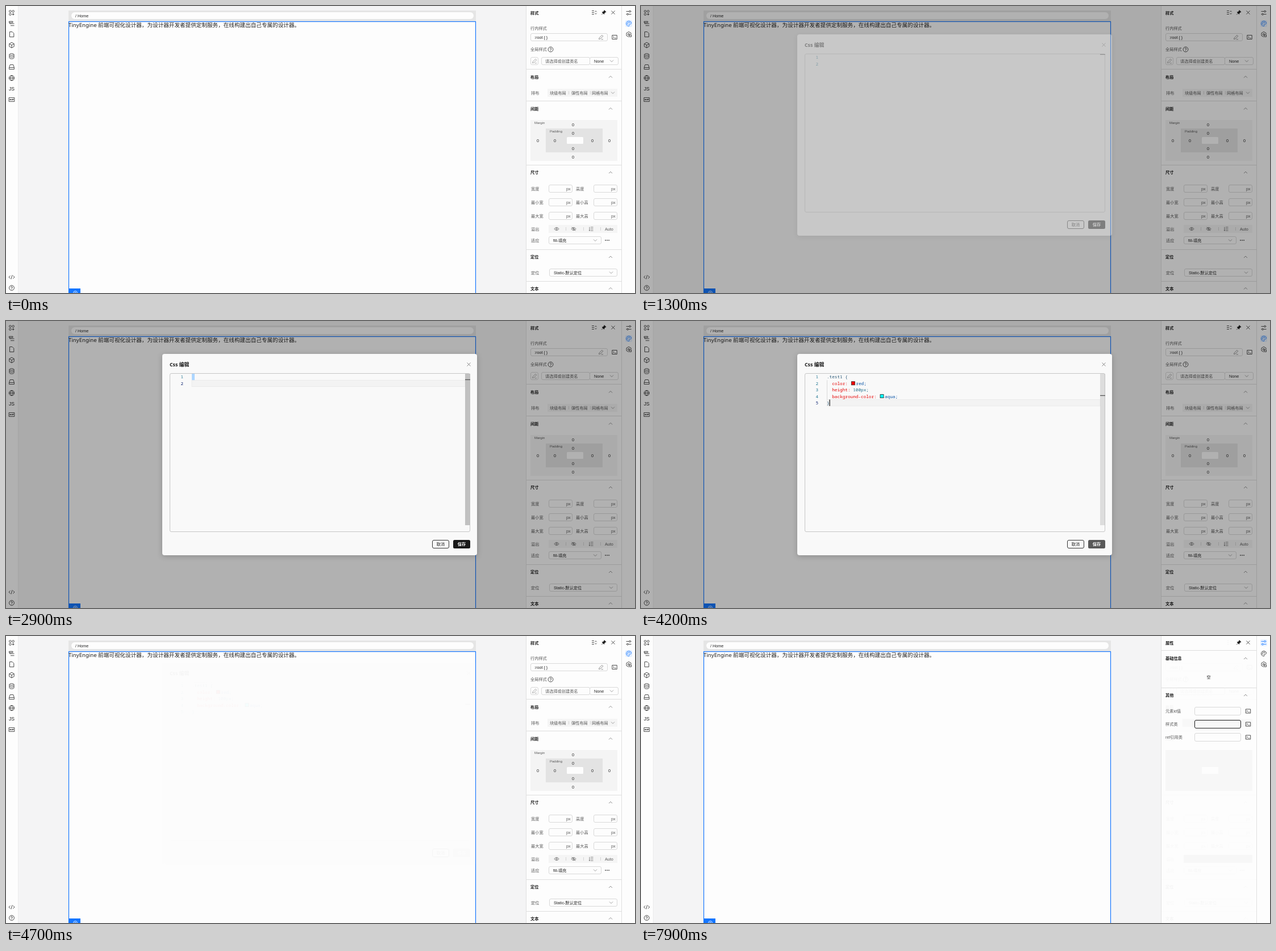
Animation of 1107 by 506 pixels, one loop 8000 ms. Source, as an HTML page:

```html
<!DOCTYPE html>
<html lang="zh-CN">
<head>
<meta charset="utf-8">
<title>Css 编辑</title>
<style>
html, body { margin: 0; width: 100%; height: 100%; overflow: hidden; background: #fdfdfd; }
svg { display: block; }
text { font: 7.2px "Liberation Sans", "Noto Sans CJK SC", "Noto Sans CJK", sans-serif; fill: #222; white-space: pre; }
.b { font-weight: bold; fill: #191919; }
.g { fill: #595959; }
.mono { font: 7.7px "Noto Sans Mono", monospace; fill: #333; }
.ui { font-family: "Noto Sans", "Noto Sans CJK SC", "Noto Sans CJK", sans-serif; }
.i { fill: none; stroke: currentColor; stroke-width: .8; stroke-linejoin: round; }
</style>
</head>
<body>
<svg id="stage" width="1107" height="506" viewBox="0 0 1107 506" color="#222"></svg>
<script>
const LOOP = 8000;

// Drawing helpers, all returning SVG markup
const rect = (x, y, w, h, fill, extra = '') =>
  `<rect x="${x}" y="${y}" width="${w}" height="${h}" fill="${fill}" ${extra}/>`;
const box = (x, y, w, h, extra = '') =>
  rect(x + .5, y + .5, w - 1, h - 1, 'none', `rx="2.5" stroke="#d9d9d9" ${extra}`);
const text = (x, y, s, cls = '', extra = '', size = 7.2, fill = '') =>
  `<text x="${x}" y="${y + size * .37}" class="${cls}" style="font-size:${size}px;fill:${fill}" ${extra}>${s}</text>`;
const mid = 'text-anchor="middle"';
const icon = (x, y, d, extra = '') =>
  `<path class="i" transform="translate(${x} ${y})" d="${d}" ${extra}/>`;
const circle = (x, y, r) => `M${x - r} ${y}a${r} ${r} 0 1 0 ${2 * r} 0a${r} ${r} 0 1 0 ${-2 * r} 0`;
const rule = y => rect(916, y, 168, 1, '#dedede');
const group = (id, body) => `<g id="${id}">${body}</g>`;

const ICON = {
  up: 'M-3 1.5L0 -1.5L3 1.5',
  down: 'M-3 -1.5L0 1.5L3 -1.5',
  close: 'M-3 -3L3 3M3 -3L-3 3',
  pencil: 'M-3.5 3.5l.6-2.4L2 -3.6l1.8 1.8L-1.1 3zM.5 3.8h3.5',
  term: 'M-4.2 -3.5h8.4v7h-8.4zM-2.4 -1.4L-.8 0L-2.4 1.4M.3 1.6h2',
  pin: 'M1 -4L4 -1L2.6 -.6L.8 1.6L.6 3L-3 -.6L-1.6 -.8L.6 -2.6zM-1.2 1.2L-3.8 3.8',
  list: 'M-4 -3h4M-4 0h4M-4 3h4M1.5 -1.2L3 -2.8L4.5 -1.2M1.5 1.2L3 2.8L4.5 1.2',
  eye: 'M-4.2 0Q0 -5.4 4.2 0Q0 5.4 -4.2 0z' + circle(0, 0, 1.3),
  sliders: 'M-4.5 -2.5h5M3.5 -2.5h1M-4.5 2.5h1M-.5 2.5h5' + circle(2, -2.5, 1.4) + circle(-2, 2.5, 1.4),
  palette: 'M0 -4.5a4.5 4.5 0 1 0 0 9c1.5 0 1 -1.3 .6 -2s0 -1.6 1.2 -1.6h1.6c3 -1.4 .4 -5.4 -3.4 -5.4z' +
    circle(-2.2, .5, .6) + circle(-1.2, -2, .6) + circle(1.6, -2, .6),
  gear: 'M-4 -2.3L0 -4.6L4 -2.3V0M-4 -2.3V2.3L0 4.6M1 1h3.5v3.2h-3.5z' + circle(0, 0, 1.5),
  help: circle(0, 0, 4.4) + 'M-1.4 -1.1a1.4 1.4 0 1 1 1.4 1.6v.8M0 2v.8'
};
const close = (x, y) => icon(x, y, ICON.close);
const pin = icon(1052, 11.5, ICON.pin, 'style="fill:#191919"');
const section = (y, s) => text(923, y, s, 'b') + icon(1064, y, ICON.up, 'color="#777"');

const sidebar = () => {
  const marks = [
    [12, circle(-2.6, -2.6, 1.8) + circle(2.6, -2.6, 1.8) + circle(-2.6, 2.6, 1.8) + 'M2.6 .6v4M.6 2.6h4'],
    [31, 'M-4.5 -3.8h6.5v2h-6.5zM-2 .2h6.5M-2 3.6h6.5M-3.5 -1.6v1.8h2'],
    [50, 'M-3.5 -4.5h4.5l2.8 2.8v6.2h-7.3z'],
    [69, 'M0 -4.8L4.2 -2.4V2.4L0 4.8L-4.2 2.4V-2.4zM-4.2 -2.4L0 0L4.2 -2.4M0 0V4.8'],
    [88.5, 'M-4 -3a4 1.6 0 1 0 8 0a4 1.6 0 1 0 -8 0V3a4 1.6 0 0 0 8 0V-3M-4 0a4 1.6 0 0 0 8 0'],
    [107.5, 'M-2.8 -4h5.6l1.6 5v3h-8.8v-3zM-4.4 1h8.8'],
    [127, circle(0, 0, 4.6) + 'M-4.6 0h9.2M0 -4.6Q-4.6 0 0 4.6Q4.6 0 0 -4.6'],
    [165, 'M-4.8 -3.4h9.6v6.8h-9.6zM-3 -1v2.2M-1.4 -1v2.2M-3 0h1.6M.2 -1v2.2M1.8 1.2v-2.2h1.3v1.2h-1.3'],
    [478, 'M-2.4 -2.6L-5 0L-2.4 2.6M2.4 -2.6L5 0L2.4 2.6M1 -3.6L-1 3.6'],
    [497, ICON.help]
  ];
  return rect(0, 0, 22, 506, '#fdfdfd') + rect(21, 0, 1, 506, '#ececec') +
    marks.map(([y, d]) => icon(10, y, d)).join('') + text(10, 146.3, 'JS', '', mid, 8.6);
};

const canvas = () =>
  rect(110, 8, 717, 19, '#e5e5e5') + rect(115, 11, 708, 12, '#fdfdfd', 'rx="6"') +
  text(122, 17, '/ Home') + rect(110.5, 27.5, 716, 490, '#fdfdfd', 'stroke="#1476ff" stroke-width="1.2"') +
  text(110, 33.8, 'TinyEngine 前端可视化设计器，为设计器开发者提供定制服务，在线构建出自己专属的设计器。', 'ui', '', 9.6) +
  rect(110, 498, 21, 8, '#1476ff') + icon(122, 506, circle(0, 0, 3.5) + circle(0, 0, 1.2), 'color="#fff"');

const stylePanel = () => {
  const zeros = [[998, 209], [998, 224], [998, 251], [998, 266], [936, 237], [966, 237], [1032, 237], [1062, 237]];
  const sizes = [[322, '宽度', '高度'], [346, '最小宽', '最小高'], [370, '最大宽', '最大高']];
  const sizeInput = (x, y) => box(x, y - 7, 42, 14) + text(x + 31, y, 'px', 'g');
  const chevron = (x, y) => icon(x, y, ICON.down, 'color="#888"');
  return text(923, 12, '样式', 'b') + icon(1035, 11.5, ICON.list) + pin + close(1068.5, 11.5) +
    text(923, 39, '行内样式', 'g') + box(923, 48, 136, 14) + text(930, 55, ':root { }') +
    icon(1047, 55, ICON.pencil, 'color="#777"') + icon(1071, 55, ICON.term) +
    text(923, 76, '全局样式', 'g') + icon(958.5, 76.5, ICON.help) +
    box(923, 90, 14, 14) + icon(930, 97, ICON.pencil, 'color="#999"') +
    box(1027, 90, 51, 14) + box(942, 90, 86, 14, 'id="classSelect"') +
    text(949, 97.3, '请选择或创建类名', 'g') + text(1035, 97, 'None') + chevron(1066, 97) +
    rule(111) + section(125, '布局') + text(924, 153, '排布', 'g') + rect(953, 146, 123, 14, '#f5f5f5') +
    ['块级布局', '弹性布局', '网格布局'].map((s, i) => text([957, 995, 1031][i], 153, s, 'g')).join('') +
    rect(990, 150, 1, 6, '#d5d5d5') + rect(1028, 150, 1, 6, '#d5d5d5') + chevron(1068, 153) +
    rule(167) + section(181, '间距') + rect(923, 201, 153, 72, '#f4f4f4') + rect(950, 216, 100, 42, '#e3e3e3') +
    rect(987, 231, 29, 12, '#fdfdfd', 'rx="1.5"') +
    text(930, 205.5, 'Margin', 'g', '', 6) + text(957, 220.5, 'Padding', 'g', '', 6) +
    zeros.map(([x, y]) => text(x, y, '0', '', mid)).join('') +
    rule(280) + section(293.5, '尺寸') +
    sizes.map(([y, a, b]) => text(924, y, a, 'g') + sizeInput(955, y) + text(1003, y, b, 'g') + sizeInput(1034, y)).join('') +
    text(924, 393, '溢出', 'g') + rect(955, 386, 121, 14, '#f5f5f5') +
    [985, 1016, 1046].map(x => rect(x, 390, 1, 6, '#d5d5d5')).join('') +
    icon(969, 393, ICON.eye, 'color="#666"') + icon(999, 393, ICON.eye + 'M-3.5 -3L3.5 3', 'color="#666"') +
    icon(1030, 393, 'M-1 -3h4.5M-1 0h4.5M-1 3h4.5M-3 -3.4v6.8M-4 2l1 1.4l1 -1.4', 'color="#666"') +
    text(1054, 393, 'Auto', 'g') +
    text(924, 413, '适应', 'g') + box(955, 406, 93, 14) + text(963, 413, 'fill-填充') + chevron(1037, 413) +
    [1055, 1058, 1061].map(x => rect(x - .7, 412.3, 1.5, 1.5, '#222')).join('') +
    rule(429) + section(442.5, '定位') + text(924, 470, '定位', 'g') + box(956, 463, 120, 14) +
    text(964, 470, 'Static-默认定位') + chevron(1065, 470) + rule(485) + section(498, '文本');
};

const attrPanel = () => {
  const row = (y, s, id) => text(923, y, s, 'g') + box(974, y - 7, 82, 15, `id="${id}"`) + icon(1068.5, y + .5, ICON.term);
  return rect(953, 146, 123, 14, '#f8f8f8') + rect(923, 201, 153, 72, '#f7f7f7') +
    rect(987, 231, 29, 12, '#fdfdfd') + rect(955, 386, 121, 14, '#f7f7f7') +
    text(923, 12, '属性', 'b') + pin + close(1068.5, 11.5) + rule(25) + section(39.5, '基础信息') +
    text(999, 72, '空', '', mid) + rule(91) + section(104.5, '其他') +
    row(132, '元素id值', 'idInput') + row(155, '样式类', 'classInput') + row(178, 'ref引用类', 'refInput');
};

const lineY = n => 98.6 + 11.4 * (n - 1);
const dialog = () => {
  const col = n => 327 + 4.62 * n;
  const mono = (x, n, s, color) => text(x, lineY(n), s, 'mono', '', 7.7, color);
  const prop = (n, s) => mono(col(2), n, s + ':', '#e50000');
  const swatch = (x, n, color, name) =>
    rect(x, lineY(n) - 3.2, 6, 6, color, 'stroke="#222" stroke-width=".8"') +
    mono(x + 8, n, name + ';', '#0451a5');
  const code = rect(327, 104.3, .7, 34, '#ccc') + mono(col(0), 1, '.test1 {', '#2b5a78') +
    prop(2, 'color') + swatch(370.3, 2, '#f00', 'red') +
    prop(3, 'height') + mono(col(10), 3, '100px;', '#23708c') +
    prop(4, 'background-color') + swatch(421, 4, '#0ff', 'aqua') + mono(col(0), 5, '}', '#2b5a78');
  const numbers = [1, 2, 3, 4, 5].map(n =>
    `<text id="n${n}" class="mono" x="312" y="${lineY(n) + 2.8}" text-anchor="end">${n}</text>`).join('');
  return rect(275, 58, 554, 355, '#f9f9f9', 'rx="4" style="filter:drop-shadow(0 2px 5px rgba(0,0,0,.2))"') +
    text(288, 77, 'Css 编辑', 'b ui', '', 8.8) + icon(814.5, 76.5, ICON.close, 'color="#666"') +
    box(288, 92, 529, 280, 'style="stroke:#c6c6c6"') +
    rect(327, 0, 481, 11.4, '#f3f3f3', 'id="current" stroke="#e9e9e9" stroke-width=".8"') +
    rect(327, 93, 5, 11.2, '#add6ff', 'id="selection"') +
    numbers + group('code', code) + rect(331.5, 0, 1.2, 11.4, '#111', 'id="caret"') +
    rect(808, 93, 9, 267, '#c1c1c1', 'id="slider"') + rect(808, 0, 9, 1.3, '#555', 'id="marker"') +
    box(750, 386, 30, 15, 'style="stroke:#333"') + text(765, 393.5, '取消', '', mid) +
    rect(787, 386, 30, 15, '#191919', 'id="save" rx="2.5"') +
    text(802, 393.5, '保存', 'b', mid, 7.2, '#fff');
};

document.getElementById('stage').innerHTML =
  rect(0, 0, 1107, 506, '#f4f4f5') + sidebar() + canvas() +
  rect(915, 0, 192, 506, '#fdfdfd') + rect(915, 0, 1, 506, '#e0e0e0') + rect(1083, 0, 1, 506, '#e0e0e0') +
  group('styles', stylePanel()) + group('attrs', attrPanel()) +
  rect(1090, 0, 12, 12, '#e6f0ff', 'id="tab" rx="2"') +
  group('tabAttrs', icon(1096, 12, ICON.sliders)) + group('tabStyles', icon(1096, 31, ICON.palette)) +
  icon(1096, 50, ICON.gear) +
  rect(0, 0, 1107, 506, '#000', 'id="mask" opacity=".3"') + group('dialog', dialog());

const el = Object.fromEntries([...document.querySelectorAll('[id]')].map(e => [e.id, e]));
const set = (id, name, value) => el[id].setAttribute(name, value);
const show = (id, on) => set(id, 'display', on ? 'inline' : 'none');
// Value of the last [time, value] step that has been reached
const step = (t, first, ...steps) => steps.reduce((v, [at, next]) => t >= at ? next : v, first);
const border = k => { const c = Math.round(217 - 192 * k); return `rgb(${c},${c},${c})`; };

function draw(t) {
  // Side panels and tabs
  const attrs = t >= 6600;
  set('styles', 'opacity', attrs ? .03 : 1);
  show('attrs', attrs);
  set('tab', 'y', attrs ? 6 : 25);
  set('tabAttrs', 'color', attrs ? '#1476ff' : '#222');
  set('tabStyles', 'color', attrs ? '#222' : '#1476ff');
  set('classSelect', 'stroke', border(step(t, 0, [200, .4], [1300, 0], [5700, .4])));
  set('classInput', 'stroke', border(step(t, 0, [7200, .5], [7300, 1], [7500, .5], [7600, 0], [7800, .5], [7900, 1])));
  set('refInput', 'stroke', border(step(t, 0, [7500, .5], [7600, 1], [7800, .5], [7900, 0])));

  // Dialog fade and slide
  show('mask', t >= 1300 && t < 4700);
  set('dialog', 'opacity', step(t, 0, [1300, .33], [1400, .8], [1500, .96], [1600, 1], [4600, .45], [4700, .03], [4800, 0]));
  const dy = step(t, -8, [1400, -3], [1500, -1], [1600, 0], [4600, -7.5], [4700, -11]);
  set('dialog', 'transform', `translate(0 ${dy})`);

  // Editor
  const pasted = t >= 3000, focused = t >= 1900 && t < 4300;
  const line = pasted ? 5 : t >= 1900 ? 2 : 1;
  for (let n = 1; n <= 5; n++) {
    show('n' + n, pasted || n < 3);
    el['n' + n].style.fill = focused && n === line ? '#0b216f' : '#237893';
  }
  show('code', pasted);
  set('current', 'y', lineY(line) - 5.7);
  show('current', focused);
  show('selection', t >= 2400 && !pasted);
  set('caret', 'x', pasted ? 331.5 : 327);
  set('caret', 'y', lineY(line) - 5.7);
  show('caret', focused && (t < 2400 || pasted && !(t >= 3500 && t < 3900)));
  set('marker', 'y', step(t, 92.8, [1900, 102.8], [3000, 130.8]));
  set('slider', 'opacity', step(t, 0, [2900, 1], [4100, .75], [4200, .5], [4300, .25], [4400, 0]));
  set('save', 'fill', step(t, '#191919', [4200, '#595959'], [4600, '#adadad']));
}

const start = performance.now();
function tick() {
  draw((performance.now() - start) % LOOP);
  requestAnimationFrame(tick);
}
tick();
</script>
</body>
</html>
```
